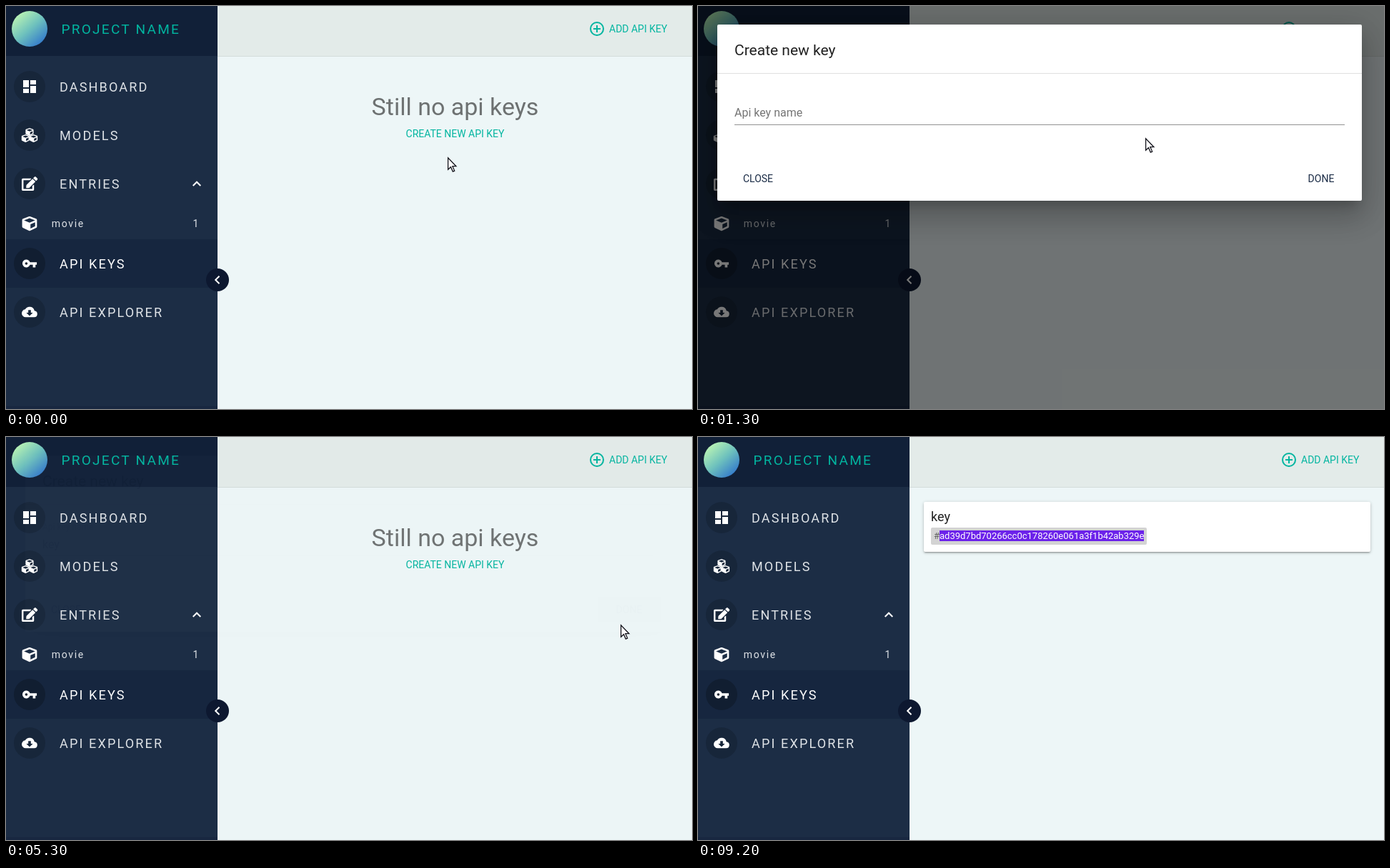
Animation of 960 by 565 pixels, one loop 9.3 s. Source, as an HTML page:

```html
<!DOCTYPE html>
<html lang="en">
<head>
<meta charset="utf-8">
<title>Api keys</title>
<style>
html, body { margin: 0; width: 100%; height: 100%; overflow: hidden; }
#stage { position: relative; width: 960px; height: 565px; overflow: hidden; background: #edf6f7; }
#stage > * { position: absolute; left: 0; top: 0; }
svg { display: block; width: 960px; height: 565px; overflow: visible; }
text { font: 14px Roboto, sans-serif; white-space: pre; }
.menu text { font-size: 18px; letter-spacing: .12em; fill: #dfe3e7; }
.menu .small { font-size: 14px; }
.menu .on { fill: #fff; }
.teal { fill: #02b5a0; }
.mid { text-anchor: middle; }
.navy { fill: #1b2c46; }
.ink { fill: #212121; }
#stage > #card { left: 316px; top: 91px; width: 625px; height: 70px; border-radius: 2px; background: #fff;
  box-shadow: 0 1px 5px rgba(0,0,0,.2), 0 2px 2px rgba(0,0,0,.14), 0 3px 1px -2px rgba(0,0,0,.12); }
#card svg { margin: -91px 0 0 -316px; }
#card text { font-size: 13px; }
#shade { width: 960px; height: 565px; background: rgba(0,0,0,.53); }
#stage > #dialog { left: 27px; top: 26px; width: 902px; height: 247px; border-radius: 2px; background: #fff;
  box-shadow: 0 11px 15px -7px rgba(0,0,0,.2), 0 24px 38px 3px rgba(0,0,0,.14), 0 9px 46px 8px rgba(0,0,0,.12); }
#dialog svg { margin: -26px 0 0 -27px; }
</style>
</head>
<body>
<div id="stage">
  <svg>
    <defs>
      <linearGradient id="ball" x1=".15" y1=".1" x2=".85" y2=".9">
        <stop offset="0" stop-color="#b9f3b4"/><stop offset=".5" stop-color="#6fc2bd"/><stop offset="1" stop-color="#347bcb"/>
      </linearGradient>
      <path id="cube" d="M239 6l-208 78c-19 7-31 25-31 45v225c0 18 10 35 26 43l208 104c14 7 30 7 43 0l208-104c17-8 27-25 27-43V129c0-20-13-38-31-45L273 6c-11-4-23-4-34 0zM256 68l192 72v2l-192 78-192-78v-2zm32 356V275l160-65v134z"/>
      <clipPath id="createBox"><rect x="544" y="161" width="169" height="36" rx="2"/></clipPath>
      <clipPath id="doneBox"><rect x="828" y="224" width="88" height="36" rx="2"/></clipPath>
    </defs>

    <rect x="296" width="664" height="70" fill="#e3ebe9"/>
    <rect x="296" y="70" width="664" height="1" fill="#d3dcda"/>
    <g fill="none" stroke="#02b5a0" stroke-width="2"><circle cx="827" cy="32" r="9"/><path d="M822 32h10M827 27v10"/></g>
    <text class="teal" x="844" y="37">ADD API KEY</text>

    <g id="empty">
      <text class="mid" x="628.5" y="153" style="font-size:34px" fill-opacity=".54">Still no api keys</text>
      <g clip-path="url(#createBox)">
        <rect id="createHover" x="544" y="161" width="169" height="36" fill="#02b5a0"/>
        <circle id="createRipple" cx="627" cy="185" fill="#02b5a0" fill-opacity=".25"/>
      </g>
      <text class="teal mid" x="628.5" y="184">CREATE NEW API KEY</text>
    </g>

    <rect width="296" height="565" fill="#1c2d45"/>
    <rect width="296" height="70" fill="#112038"/>
    <rect y="327" width="296" height="68" fill="#16263f"/>
    <rect y="561" width="296" height="4" fill="#182740"/>
    <circle cx="33" cy="32" r="25" fill="url(#ball)"/>
    <g fill="#17263a">
      <circle cx="33" cy="113" r="22"/><circle cx="33" cy="181" r="22"/><circle cx="33" cy="249" r="22"/>
      <circle cx="33" cy="361" r="22" fill="#111e31"/><circle cx="33" cy="429" r="22"/>
    </g>
    <g fill="#fff" fill-rule="evenodd">
      <path transform="translate(21 101)" d="M3 13h8V3H3zm0 8h8v-6H3zm10 0h8V11h-8zm0-18v6h8V3z"/>
      <use href="#cube" transform="translate(27.4 171) scale(.0218)"/>
      <use href="#cube" transform="translate(21.8 180) scale(.0218)"/>
      <use href="#cube" transform="translate(33 180) scale(.0218)"/>
      <path transform="translate(22 239.3) scale(.0385)" d="M403 83l90 90c4 4 4 10 0 14L274 406l-92 10c-13 1-23-9-22-22l10-92L389 83c4-4 10-4 14 0zm162-23l-49-48c-15-16-40-16-55 0l-36 35c-4 4-4 10 0 14l90 90c4 4 10 4 14 0l36-35c15-16 15-40 0-56zM384 346v102H64V128h230c3 0 6-1 8-3l40-40c8-8 3-21-8-21H48C21 64 0 85 0 112v352c0 27 21 48 48 48h352c27 0 48-21 48-48V306c0-10-13-16-20-8l-40 40c-3 2-4 5-4 8z"/>
      <use href="#cube" transform="translate(22.6 294.8) scale(.0405)"/>
      <path transform="translate(22 350) scale(.917)" d="M12.65 10A6 6 0 1 0 12.65 14H17v4h4v-4h2v-4zM7 14a2 2 0 1 1 0-4 2 2 0 0 1 0 4z"/>
      <path transform="translate(22 418) scale(.917)" d="M19.35 10.04A7.5 7.5 0 0 0 5.35 8.04 6 6 0 0 0 6 20h13a5 5 0 0 0 .35-9.96zM17 13l-5 5-5-5h3V9h4v4z"/>
    </g>
    <g class="menu">
      <text x="77.5" y="39" style="font-size:19px;fill:#02b5a0">PROJECT NAME</text>
      <text x="75" y="120">DASHBOARD</text>
      <text x="75" y="188">MODELS</text>
      <text x="75" y="256">ENTRIES</text>
      <text x="63.7" y="310" class="small">movie</text>
      <text x="261.5" y="310" class="small">1</text>
      <text x="75" y="368" class="on">API KEYS</text>
      <text x="75" y="436">API EXPLORER</text>
    </g>
    <circle cx="296" cy="384" r="16" fill="#0d1830"/>
    <path d="M261.7 252l5.3-5.3 5.3 5.3M298.5 378.7l-5.3 5.3 5.3 5.3" fill="none" stroke="#fff" stroke-width="2"/>
  </svg>

  <div id="card"><svg>
    <text class="ink" x="326" y="118" style="font-size:18px">key</text>
    <rect x="326" y="127" width="302" height="24" rx="2" fill="#d3d3d3"/>
    <rect id="selection" x="338" y="131" width="286" height="15" fill="#6c22ea"/>
    <text x="330" y="143" fill="#616161">#</text>
    <text id="hash" x="338" y="143">ad39d7bd70266cc0c178260e061a3f1b42ab329e</text>
    <g id="actions"><text class="teal" x="647.5" y="143">EDIT</text><text x="699" y="143" fill="#f00000">DELETE</text></g>
  </svg></div>

  <div id="shade"></div>
  <div id="dialog"><svg>
    <text class="ink" x="51" y="69" style="font-size:21px">Create new key</text>
    <rect x="27" y="94" width="902" height="1" fill="#e0e0e0"/>
    <text id="label" style="font-size:16px">Api key name</text>
    <text id="typed" class="ink" x="51" y="156" style="font-size:16px"></text>
    <rect id="caret" y="141" width="1" height="19" fill="#111"/>
    <rect x="51" y="166" width="854" height="1" fill="#929292"/>
    <rect id="focusLine" y="165" height="2" class="navy"/>
    <g clip-path="url(#doneBox)" class="navy">
      <rect id="doneHover" x="828" y="224" width="88" height="36"/>
      <circle id="doneRipple" cx="862" cy="248" fill-opacity=".2"/>
    </g>
    <text class="navy mid" x="84" y="247">CLOSE</text>
    <text class="navy mid" x="872" y="247">DONE</text>
  </svg></div>

  <svg>
    <g id="arrow"><path d="M.6 .8V17.3l3.9-3.6 2.8 6.4 2.4-1-2.8-6.4h5z" fill="#fff" stroke="#14141c" stroke-width="1.3"/></g>
    <g id="beam" fill="none">
      <path d="M-4-7h3l1 1 1-1h3M0-6V7M-4 8h3l1-1 1 1h3" stroke="#fff" stroke-width="3"/>
      <path d="M-4-7h3l1 1 1-1h3M0-6V7M-4 8h3l1-1 1 1h3" stroke="#111" stroke-width="1.4"/>
    </g>
  </svg>
</div>
<script>
const LOOP = 9300, STEP = 100;
const $ = id => document.getElementById(id);
const set = (id, attrs) => { for (const k in attrs) $(id).setAttribute(k, attrs[k]); };
const show = (id, on) => { $(id).style.display = on ? '' : 'none'; };
const ramp = (t, from, length) => {
  const p = Math.min(1, Math.max(0, (t - from) / length));
  return p * p * (3 - 2 * p);
};

// pointer path: time, x, y
const path = [
  [0, 618, 212], [500, 626, 185], [1500, 626, 185], [1900, 612, 150], [2100, 610, 150],
  [2300, 608, 171], [4700, 608, 171], [4900, 862, 248], [5200, 862, 248], [5300, 860, 263],
  [5400, 860, 263], [5500, 760, 262], [5600, 760, 262], [5700, 666, 257], [6200, 666, 257],
  [6300, 587, 195], [6600, 587, 195], [6800, 557, 146], [8600, 557, 146], [8700, 546, 142],
  [8800, 546, 142], [9000, 138, -11], [9100, 138, -11], [9200, 138, -60], [9300, 138, -60]
];

function pointer(t) {
  const i = path.findIndex(k => k[0] > t);
  const [t0, x0, y0] = path[i - 1], [t1, x1, y1] = path[i];
  const p = (t - t0) / (t1 - t0);
  return [x0 + (x1 - x0) * p, y0 + (y1 - y0) * p];
}

function draw(t) {
  const [x, y] = pointer(t);
  const listed = t >= 5700;
  const overCard = listed && x > 316 && y > 91 && y < 161;
  const overInput = t > 1500 && t < 5300 && y > 136 && y < 167;
  const isBeam = overCard || overInput;

  show('arrow', !isBeam);
  show('beam', isBeam);
  set(isBeam ? 'beam' : 'arrow', { transform: `translate(${Math.round(x)} ${Math.round(y)})` });

  show('empty', !listed);
  set('createHover', { 'fill-opacity': t < 1400 ? .1 * ramp(t, 200, 250) : 0 });
  set('createRipple', { r: t < 1300 ? 68 * ramp(t, 1000, 200) : 0 });

  show('card', listed);
  show('selection', t >= 7400);
  set('hash', { fill: t >= 7400 ? '#fff' : '#616161' });
  show('actions', overCard);

  const open = t < 5300 ? ramp(t, 1050, 225) : t < 5500 ? .01 : 0;
  $('shade').style.opacity = $('dialog').style.opacity = open;

  const lift = ramp(t, 1800, 250), blurred = t >= 5100;
  const line = blurred ? 0 : 854 * lift;
  set('label', {
    transform: `translate(51 ${155 - 25 * lift}) scale(${1 - .25 * lift})`,
    fill: lift > 0 && !blurred ? '#1b2c46' : '#757575'
  });
  set('focusLine', { x: 478 - line / 2, width: line });
  $('typed').textContent = t >= 3500 ? 'key' : t >= 3400 ? 'ke' : '';
  show('caret', t >= 2100 && t < 3200 || t >= 3400 && !blurred);
  set('caret', { x: Math.round(51 + $('typed').getComputedTextLength()) });
  set('doneHover', { 'fill-opacity': t >= 4900 ? .09 : 0 });
  set('doneRipple', { r: 60 * ramp(t, 5000, 200) });
}

const start = performance.now();
function tick() {
  const t = (performance.now() - start) % LOOP;
  draw(Math.floor(t / STEP) * STEP);
  requestAnimationFrame(tick);
}
tick();
</script>
</body>
</html>
```
